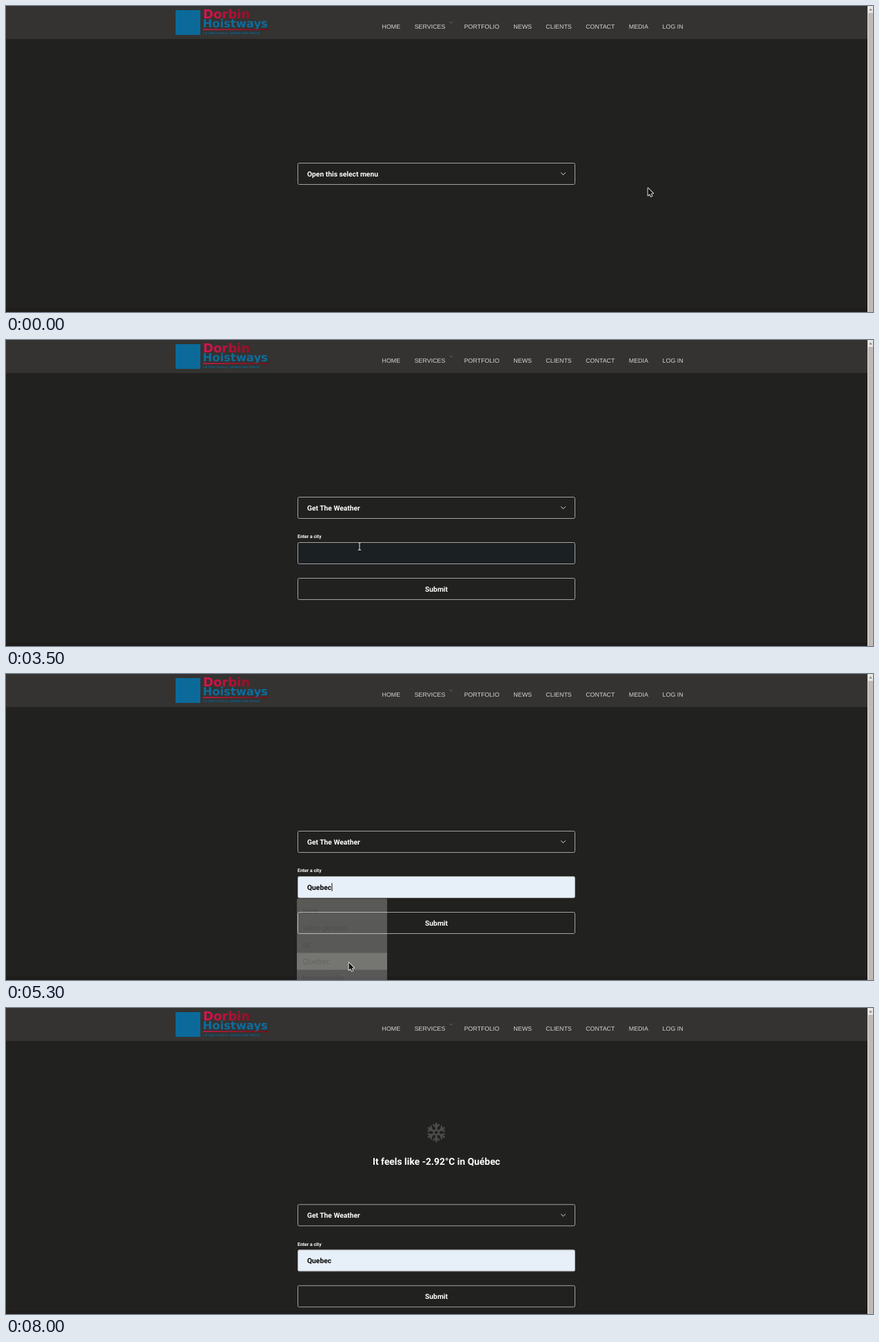
An HTML page with a canvas for the animation above (9600 ms loop, 1258x445 px).

```html
<!DOCTYPE html>
<html lang="en">
<head>
<meta charset="utf-8">
<title>Weather form</title>
<style>
  html, body { margin: 0; width: 100%; height: 100%; overflow: hidden; background: #21211f; }
  canvas { display: block; }
</style>
</head>
<body>
<canvas id="stage" width="1258" height="445"></canvas>
<script>
const ctx = document.getElementById("stage").getContext("2d");
const LOOP = 9600, STEP = 100;
const OPEN = 800, CHOSEN = 2600, LIST_IN = 3900, LIST_OUT = 5200, SENT = 6300, ANSWER = 6600;

const ROBOTO = "Roboto, sans-serif";
const ARIAL = "'Liberation Sans', Arial, sans-serif";
const LINE = "#a3a3a1", ACTIVE = "#1b2023", FILLED = "#e7eff9";

const NAV = [["HOME", 545.5], ["SERVICES", 592.7], ["PORTFOLIO", 664.7], ["NEWS", 736.3],
  ["CLIENTS", 783.3], ["CONTACT", 841.2], ["MEDIA", 903.8], ["LOG IN", 952.6]];
const OPTIONS = ["Open this select menu", "Get The Weather", "Get An Advice", "Get A Random Cat Gif",
  "-- Jokes --", "Get A Dark Joke", "Get A Brock Varlen Joke", "Get A Programming Joke"];
const CITIES = ["lévis", "saint-gervais", "qc", "Quebec", "breakeyville"];
const ROW = 24.6, LIST = { x: 422, y: 326.5, w: 131, h: 130 };

// Pointer path: time, x, y
const PATH = [[0, 931, 264], [100, 931, 264], [400, 829, 246], [500, 829, 246], [700, 766, 241],
  [1100, 766, 241], [1500, 660, 258], [2000, 536, 275], [2800, 536, 275], [3300, 512.5, 296],
  [3400, 512.5, 296], [3500, 513, 300], [4200, 513, 300], [4900, 497, 419], [5500, 497, 419],
  [6000, 533, 357], [7000, 533, 357], [7200, 533, 290], [7400, 600, 110], [7500, 655, 47],
  [7600, 709, 109], [7700, 709, 109], [7900, 510, 12], [8000, 505, -20]];

function pointerAt(t) {
  const i = PATH.findIndex(p => p[0] > t);
  if (i < 0) return { x: 505, y: -20 };
  const [t0, x0, y0] = PATH[i - 1], [t1, x1, y1] = PATH[i];
  const k = (t - t0) / (t1 - t0);
  return { x: x0 + (x1 - x0) * k, y: y0 + (y1 - y0) * k };
}

// CSS "ease": cubic-bezier(.25, .1, .25, 1)
function ease(x) {
  if (x <= 0) return 0;
  if (x >= 1) return 1;
  const curve = (a, b, s) => 3 * a * s * (1 - s) ** 2 + 3 * b * s * s * (1 - s) + s ** 3;
  let lo = 0, hi = 1;
  for (let i = 0; i < 24; i++) {
    const mid = (lo + hi) / 2;
    if (curve(.25, .25, mid) < x) lo = mid; else hi = mid;
  }
  return curve(.1, 1, lo);
}

function rect(x, y, w, h, fill) {
  ctx.fillStyle = fill;
  ctx.fillRect(x, y, w, h);
}

function text(str, x, y, font, fill = "#fff", align = "left") {
  ctx.font = font;
  ctx.fillStyle = fill;
  ctx.textAlign = align;
  ctx.fillText(str, x, y);
}

const bold = size => `700 ${size}px ${ROBOTO}`;

function line(points, color, width) {
  ctx.beginPath();
  points.forEach(([x, y]) => ctx.lineTo(x, y));
  ctx.strokeStyle = color;
  ctx.lineWidth = width;
  ctx.stroke();
}

function outlined(points, fill, edge) {
  ctx.beginPath();
  points.forEach(([x, y]) => ctx.lineTo(x, y));
  ctx.closePath();
  ctx.lineJoin = "round";
  ctx.strokeStyle = edge;
  ctx.lineWidth = 1.8;
  ctx.stroke();
  ctx.fillStyle = fill;
  ctx.fill();
  ctx.lineJoin = "miter";
}

function field(y, fill) {
  ctx.beginPath();
  ctx.roundRect(423.5, y, 402, 31, 2);
  if (fill) {
    ctx.fillStyle = fill;
    ctx.fill();
  }
  ctx.strokeStyle = LINE;
  ctx.lineWidth = 1;
  ctx.stroke();
}

function drawHeader() {
  rect(0, 0, 1250, 48, "#343331");
  rect(246, 6, 36, 36, "#0b6a99");
  const red = ctx.createLinearGradient(286, 0, 381, 0);
  red.addColorStop(0, "#dc1550");
  red.addColorStop(1, "#7c0a14");
  text("Dorbin", 286, 17.5, "700 18px 'DejaVu Sans', sans-serif", red);
  text("Hoistways", 285.5, 31, "700 16.4px 'DejaVu Sans', sans-serif", "#0e6c9c");
  rect(286, 33.5, 95, 1.5, red);
  text("LIFTING SAFELY, SPEED AND SPACE", 286, 41, `700 4.6px ${ARIAL}`, "#0b6290");
  NAV.forEach(([label, x]) => text(label, x, 32.8, `8.89px ${ARIAL}`, "#d4d4d3"));
  line([[643.5, 22.8], [645.7, 25], [647.9, 22.8]], "#777674", .8);
}

function drawScrollbar() {
  rect(1250, 0, 8, 445, "#e9e7e5");
  rect(1251, 10, 7, 435, "#c0bab5");
  ctx.beginPath();
  ctx.moveTo(1252, 6.5);
  ctx.lineTo(1254.5, 3.5);
  ctx.lineTo(1257, 6.5);
  ctx.fillStyle = "#8a8683";
  ctx.fill();
}

function drawMenu(hot) {
  ctx.save();
  ctx.shadowColor = "rgba(0,0,0,.4)";
  ctx.shadowBlur = 7;
  ctx.shadowOffsetY = 3;
  rect(423, 260, 403, 104.5, "#343331");
  ctx.restore();
  rect(424, 260.3 + hot * 13, 401.5, 13, "#0f99f2");
  OPTIONS.forEach((label, i) =>
    text(label, 437, 270.2 + i * 13, bold(10.27), i === 4 ? "#807f7d" : "#fff"));
  ctx.strokeStyle = "#7d7c7a";
  ctx.lineWidth = .8;
  ctx.strokeRect(423.5, 260.5, 402, 104);
}

function drawList(hot, alpha) {
  ctx.save();
  ctx.globalAlpha = alpha;
  ctx.beginPath();
  ctx.roundRect(LIST.x, LIST.y, LIST.w, LIST.h, 2);
  ctx.fillStyle = "#fefefd";
  ctx.fill();
  if (hot >= 0) rect(LIST.x, 331.8 + hot * ROW, LIST.w, ROW, "#c6c5c3");
  CITIES.forEach((city, i) =>
    text(city, 430.5, 348 + i * ROW, "500 10.8px 'Noto Sans', sans-serif", "#2b2b2b"));
  ctx.restore();
}

function drawFlake(x, y) {
  ctx.save();
  ctx.translate(x, y);
  ctx.lineCap = "round";
  for (let i = 0; i < 6; i++) {
    line([[0, -3.5], [0, -13]], "#4c4c4b", 2.7);
    line([[-4, -11.2], [0, -7.6], [4, -11.2]], "#4c4c4b", 2.3);
    line([[0, -4], [3.46, -2]], "#4c4c4b", 2.2);
    ctx.rotate(Math.PI / 3);
  }
  ctx.restore();
}

function drawAnswer(t) {
  const dy = 114 * (1 - ease((t - ANSWER) / 1000));
  drawFlake(624.3, 181 + dy);
  text("It feels like -2.92°C in Québec", 624.5, 227.9 + dy, bold(13.87), "#fff", "center");
}

const CURSORS = {
  arrow() {
    outlined([[.5, .8], [.5, 11.6], [3, 9.3], [4.8, 13], [6.4, 12.3], [4.7, 8.7], [8, 8.4]], "#111", "#f4f4f4");
  },
  beam() {
    for (const [color, width] of [["#111", 2.4], ["#e8e8e8", 1.1]]) {
      line([[0, -5], [0, 5]], color, width);
      line([[-2.2, -5.3], [2.2, -5.3]], color, width);
      line([[-2.2, 5.3], [2.2, 5.3]], color, width);
    }
  },
  hand() {
    outlined([[-1, 0], [.8, 0], [.9, 4.4], [6.5, 5.6], [6.6, 9], [5.4, 12.5], [-.5, 12.5],
      [-4.5, 7.6], [-3.4, 6.6], [-1, 8.2]], "#111", "#f4f4f4");
  },
  blocked() {
    for (const [color, width] of [["#e6e6e4", 3], ["#2a2a29", 1.1]]) {
      ctx.beginPath();
      ctx.arc(0, 0, 4.8, 0, 7);
      ctx.strokeStyle = color;
      ctx.lineWidth = width;
      ctx.stroke();
      line([[-3.2, 3.2], [3.2, -3.2]], color, width);
    }
  }
};

function drawCursor(kind, p) {
  ctx.save();
  ctx.translate(p.x, p.y);
  CURSORS[kind]();
  ctx.restore();
}

function draw(t) {
  const p = pointerAt(t);
  const drop = t >= ANSWER ? 57.3 : 0;
  const selectY = 228.5 + drop, inputY = 294.5 + drop, submitY = 346.5 + drop;
  const over = y => p.x > 423 && p.x < 826 && p.y > y && p.y < y + 31;
  const menu = t >= OPEN && t < CHOSEN;
  const listed = t >= LIST_IN && t < LIST_OUT;
  const sending = t >= SENT && t < ANSWER;
  const row = listed || t < LIST_OUT + 200 ? Math.floor((p.y - 331.8) / ROW) : -1;
  const city = listed ? CITIES[row] : t >= LIST_OUT ? "Quebec" : "";

  ctx.textRendering = "geometricPrecision";
  rect(0, 0, 1258, 445, "#21211f");
  rect(0, 440, 1250, 5, "#1f1c1c");
  drawHeader();
  drawScrollbar();

  field(selectY, menu || over(selectY) ? ACTIVE : null);
  text(OPTIONS[t < CHOSEN ? 0 : 1], 437, selectY + 19.1, bold(10.27));
  line([[805.2, selectY + 13.8], [808.5, selectY + 17.1], [811.8, selectY + 13.8]], "#e2e2e1", 1);

  let kind = "arrow";
  if (t >= CHOSEN) {
    text("Enter a city", 423, inputY - 6.2, bold(6.9));
    field(inputY, city ? FILLED : over(inputY) ? ACTIVE : null);
    if (city) text(city, 437, inputY + (listed ? 18.9 : 19.1), listed ? `8.89px ${ARIAL}` : bold(10.27), "#000");
    if (t >= LIST_IN && t < 4300) rect(437, 304, 1, 12, "#ddd");
    if (t >= LIST_OUT && t < 5600) rect(472.5, 304, 1, 12, "#111");

    field(submitY, sending || over(submitY) ? ACTIVE : null);
    text("Submit", 624.5, submitY + 19.1, bold(10.27), sending ? "#dededd" : "#fff", "center");

    if (t >= LIST_IN && t < LIST_OUT + 200) {
      const alpha = t < LIST_IN + 100 ? .6 : t < LIST_OUT ? 1 : t < LIST_OUT + 100 ? .6 : .25;
      drawList(row, alpha);
    }
    if (over(inputY)) kind = "beam";
    else if (over(submitY) && !listed) kind = sending ? "blocked" : "hand";
  }
  if (menu) drawMenu(p.y >= 273 ? 1 : 0);
  if (t >= ANSWER) drawAnswer(t);
  if (t < 8000) drawCursor(kind, p);
}

const start = performance.now();
function tick() {
  const t = (performance.now() - start) % LOOP;
  draw(Math.floor(t / STEP) * STEP);
  requestAnimationFrame(tick);
}
tick();
</script>
</body>
</html>
```
